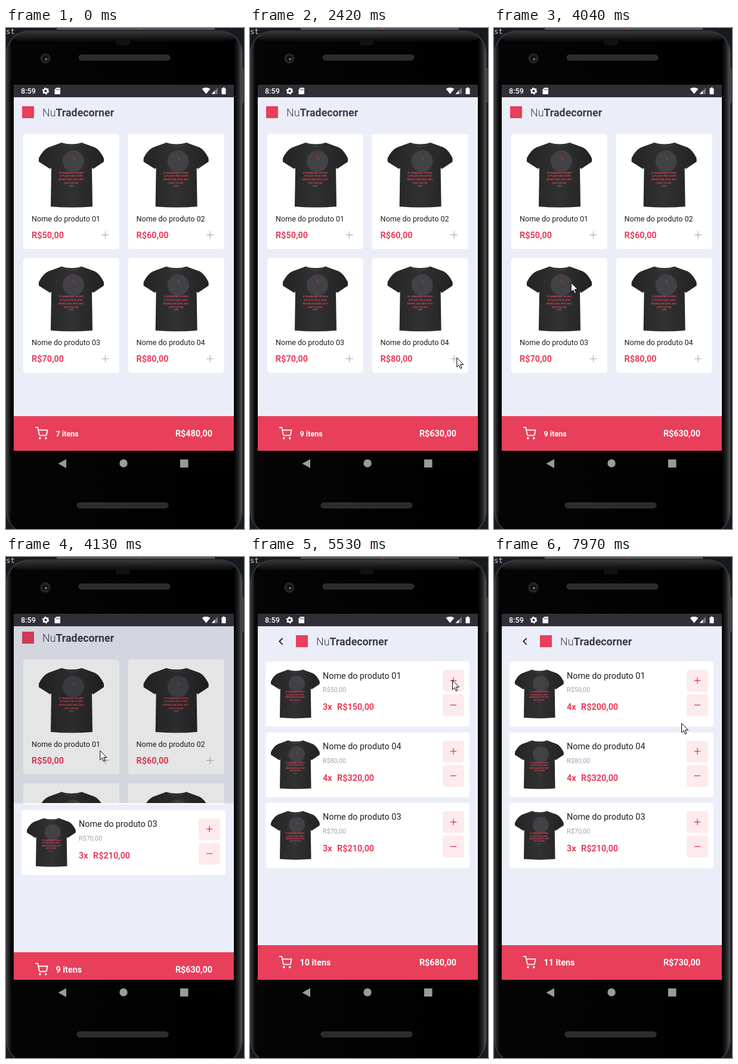
These frames come from a looping animation (399 px wide and 839 px high, 8000 ms). An HTML page:

```html
<!DOCTYPE html>
<html lang="pt-BR">
<head>
<meta charset="utf-8">
<title>Loja</title>
<style>
  html, body { margin: 0; width: 100%; height: 100%; overflow: hidden; background: #161b22; }
  svg { display: block; font-family: Roboto, sans-serif; }
  .b { font-weight: 700; }
</style>
</head>
<body>
<svg id="stage" width="399" height="839" viewBox="0 0 399 839"></svg>
<script>
const RED = '#e83f5b', PAPER = '#ebeef8', INK = '#1f1f23';
const TOP = 116, HEIGHT = 592, LOOP = 8000;
const DP = 0.898;
const SMALL = 14 * DP, MEDIUM = 16 * DP;
const stage = document.getElementById('stage');

const money = n => `R$${n},00`;
const rect = (x, y, w, h, fill, r = 0, more = '') =>
  `<rect x="${x}" y="${y}" width="${w}" height="${h}" rx="${r}" fill="${fill}" ${more}/>`;
const text = (x, y, size, fill, content, more = '') =>
  `<text x="${x}" y="${y}" font-size="${size}" fill="${fill}" ${more}>${content}</text>`;
const line = (d, color, width) =>
  `<path d="${d}" fill="none" stroke="${color}" stroke-width="${width}"/>`;
const sign = (x, y, r, color, plus = true) =>
  line(`M${x - r} ${y}h${2 * r}` + (plus ? `M${x} ${y - r}v${2 * r}` : ''), color, 1.4);

const products = [1, 2, 3, 4].map(n => ({ name: `Nome do produto 0${n}`, price: 40 + 10 * n }));
const cartOrder = [0, 3, 2];

const header = x => rect(x, 131, 20, 20, RED) +
  text(x + 34, 147.5, 17.8, '#3d3d4d',
    '<tspan font-weight="300">Nu</tspan><tspan class="b">Tradecorner</tspan>');

const footer = (id, size) => rect(13, 650, 369, 58, RED) +
  `<g transform="translate(48.8 668) scale(.9)" fill="none" stroke="#fff" stroke-width="2" stroke-linecap="round" stroke-linejoin="round">
    <circle cx="9" cy="21" r="1"/><circle cx="20" cy="21" r="1"/>
    <path d="M1 1h4l2.7 13.4a2 2 0 0 0 2 1.6h9.7a2 2 0 0 0 2-1.6L23 6H6"/></g>` +
  text(83.5, 684, size, '#fff', '', `id="${id}Count" class="b"`) +
  text(346, 684.3, MEDIUM, '#fff', '', `id="${id}Total" class="b" text-anchor="end"`);

function shopCard({ name, price }, i) {
  const x = 29 + 175.6 * (i % 2), y = 177.5 + 207.4 * (i >> 1);
  return rect(x, y, 161, 192.5, '#fff', 4.5) +
    `<use href="#tee" x="${x + 26}" y="${y + 13.5}"/>` +
    text(x + 14, y + 146.5, SMALL, INK, name) +
    text(x + 14, y + 174.5, MEDIUM, RED, money(price), 'class="b"') +
    sign(x + 137.5, y + 169, 6, '#b7b7cc');
}

function cartCard(p, row) {
  const { name, price } = products[p], y = 175 + 118.4 * row;
  return rect(26, y, 342, 109, '#fff', 4.5) +
    `<use href="#tee" transform="translate(35 ${y + 13}) scale(.75)"/>` +
    text(122, y + 28.5, MEDIUM, INK, name) +
    text(122, y + 51.3, 12 * DP, '#a0a0b2', money(price)) +
    text(122, y + 81.3, MEDIUM, RED, '', `id="qty${p}" class="b"`) +
    text(146, y + 81.3, MEDIUM, RED, '', `id="sum${p}" class="b"`) +
    rect(323, y + 14, 36, 36.5, RED, 4.5, 'opacity=".11"') + sign(341, y + 32, 5.2, RED) +
    rect(323, y + 55, 36, 36.5, RED, 4.5, 'opacity=".11"') + sign(341, y + 73, 5.2, RED, false);
}

const shirtLines = ['IF SOMEONE OFFERS', 'A PLACE ON A SHIP,', 'NEVER ASK WHY, BUT', 'JUST GO ON.'];
const defs = `<defs>
  <linearGradient id="edge"><stop offset="0" stop-color="#3a3b3d"/><stop offset=".02" stop-color="#050505"/>
    <stop offset=".965" stop-color="#000"/><stop offset=".985" stop-color="#242527"/><stop offset="1" stop-color="#555759"/></linearGradient>
  <linearGradient id="rim" x2="0" y2="1"><stop stop-color="#353638"/><stop offset="1" stop-color="#353638" stop-opacity="0"/></linearGradient>
  <pattern id="mesh" width="3" height="3" patternUnits="userSpaceOnUse"><path d="M0 3L3 0" stroke="#4a4a4a" stroke-width=".8"/></pattern>
  <linearGradient id="cloth"><stop offset="0" stop-color="#242424"/><stop offset=".5" stop-color="#313131"/><stop offset="1" stop-color="#222"/></linearGradient>
  <clipPath id="screen"><rect x="13" y="${TOP}" width="369" height="${HEIGHT}"/></clipPath>
  <clipPath id="reveal"><rect id="window" x="13" y="${TOP}" width="369" height="${HEIGHT}"/></clipPath>
  <g id="tee">
    <path d="M38 1Q55 6 72 1L94 9Q102 13 109 27V33L91 45 89 43 90 108Q55 111 20 108L21 43 19 45 0 33V27Q7 13 16 9Z" fill="url(#cloth)"/>
    <path d="M38 1Q55 14 72 1" fill="none" stroke="#454545"/>
    <circle cx="58" cy="32" r="18" fill="#414146"/>
    ${line('M56 23l5 7', '#a83a48', 1.2)}
    ${shirtLines.map((s, i) => text(54.5, 52.5 + 5.9 * i, 4.3, '#d34358', s, 'class="b" text-anchor="middle"')).join('')}
    ${text(54.5, 75, 3, '#888', 'SHIRT', 'text-anchor="middle"')}
  </g>
</defs>`;

const speaker = (x, y) => rect(x, y, 153, 9, '#202020', 4.5, 'stroke="#343434"') + rect(x, y, 153, 9, 'url(#mesh)', 4.5);

const phone = rect(85, 0, 265, 3, '#55585e') + rect(221, 0, 4, 3, '#b0404c') +
  text(-7, 10, 12, '#e7c9cd', 'ost', 'font-family="DejaVu Sans Mono, monospace"') +
  rect(393, 66, 5, 60, '#55575a', 2) +
  rect(1, 5, 395, 842, 'url(#edge)', 38, 'stroke="#3c3e40" stroke-width="1.5"') +
  rect(12, 6, 372, 18, 'url(#rim)', 28) +
  rect(184, 19, 24, 10, '#121212', 5) + speaker(122, 45) + speaker(119, 795) +
  '<circle cx="66" cy="51" r="8" fill="#202123" stroke="#303134"/><circle cx="66" cy="51" r="4" fill="#0a0c10"/><circle cx="67" cy="52" r="1.8" fill="#8a8d92"/>' +
  rect(13, 95, 369, 613, '#312e38') +
  text(25, 110.3, 12.6, '#fff', '8:59', 'font-weight="500"') +
  '<circle cx="66.5" cy="105.5" r="3.4" fill="none" stroke="#fff" stroke-width="2.6"/>' +
  '<circle cx="66.5" cy="105.5" r="5" fill="none" stroke="#fff" stroke-width="1.6" stroke-dasharray="2.6 2.63"/>' +
  '<path d="M84.5 100H91V111H81.500V103Z" fill="#fff"/>' +
  line('M84.800 102v2.500M87 102v2.500M89.200 102v2.500', '#312e38', 0.9) +
  '<path d="M328.500 102Q335.500 97.500 342.500 102L335.500 110.500Z" fill="#fff"/>' +
  '<path d="M355 100V110.500H344.500Z" fill="#77757c"/><path d="M350 105V110.500H344.500Z" fill="#fff"/>' +
  '<path d="M361.500 101H363.500V99.500H366.500V101H368.500V111H361.500Z" fill="#fff"/>' +
  '<path d="M101 722V737L87.500 729.500Z" fill="#9b9b9b"/><circle cx="197" cy="729" r="6.700" fill="#9b9b9b"/>' +
  rect(292, 722.5, 13.5, 13.5, '#9b9b9b');

stage.innerHTML = defs + phone +
  `<g clip-path="url(#screen)">
    ${rect(13, TOP, 369, HEIGHT, PAPER)}
    <g id="shop">${rect(13, TOP, 369, HEIGHT, PAPER)}${header(27)}${products.map(shopCard).join('')}${footer('shop', SMALL)}</g>
    ${rect(13, TOP, 369, HEIGHT, '#000', 0, 'id="dim"')}
    <g id="cartView" clip-path="url(#reveal)"><g id="cart">
      ${rect(13, TOP, 369, HEIGHT, PAPER)}${line('M54.700 136L49.300 141.300 54.700 146.700', INK, 1.8)}
      ${header(77)}${cartOrder.map(cartCard).join('')}${footer('cart', MEDIUM)}
    </g></g>
  </g>
  <path id="pointer" d="M.5 .5V16L4 12.700 6.500 18.500 8.900 17.400 6.400 11.800H11.500Z" fill="#fff" stroke="#000"/>`;

const el = {};
stage.querySelectorAll('[id]').forEach(node => el[node.id] = node);

// [time, product, change in quantity]
const taps = [[1640, 2, 1], [2340, 3, 1], [5290, 0, 1], [6220, 0, 1], [7070, 3, 1], [7710, 3, -1]];

// [time, x, y]
const route = [
  [70, 198, 828], [230, 280, 740], [350, 301, 660], [540, 234, 564], [630, 234, 564],
  [940, 179, 556], [1090, 174, 555], [1240, 170, 554], [1640, 168, 552], [1960, 348, 550],
  [2500, 346, 552], [3050, 182, 677], [3130, 160, 676], [3360, 80, 673], [3600, 62, 668],
  [3830, 62, 668], [4130, 157, 324], [4360, 213, 269], [4670, 328, 226], [4750, 332, 222],
  [5050, 339, 206], [6300, 339, 206], [6750, 342, 323], [7100, 342, 323], [7400, 344, 364],
  [7660, 344, 364], [7970, 314, 278], [LOOP, 314, 278]
];

function pointerAt(t) {
  const i = Math.max(1, route.findIndex(k => k[0] > t));
  const [t0, x0, y0] = route[i - 1], [t1, x1, y1] = route[i];
  const k = (t - t0) / (t1 - t0);
  return [x0 + (x1 - x0) * k, y0 + (y1 - y0) * k];
}

// cubic-bezier(.35, .45, 0, 1), solved by bisection
function ease(x) {
  if (x <= 0 || x >= 1) return x <= 0 ? 0 : 1;
  const curve = (s, a, b) => 3 * (1 - s) ** 2 * s * a + 3 * (1 - s) * s * s * b + s ** 3;
  let lo = 0, hi = 1;
  for (let i = 0; i < 24; i++) {
    const mid = (lo + hi) / 2;
    if (curve(mid, 0.35, 0) < x) lo = mid; else hi = mid;
  }
  return curve(lo, 0.45, 1);
}

function draw(t) {
  const quantity = [2, 0, 2, 3];
  for (const [time, p, change] of taps) if (t >= time) quantity[p] += change;
  const count = quantity.reduce((a, b) => a + b);
  const total = quantity.reduce((sum, q, p) => sum + q * products[p].price, 0);
  for (const view of ['shop', 'cart']) {
    el[view + 'Count'].textContent = `${count} itens`;
    el[view + 'Total'].textContent = money(total);
  }
  for (const p of cartOrder) {
    el['qty' + p].textContent = quantity[p] + 'x';
    el['sum' + p].textContent = money(quantity[p] * products[p].price);
  }

  const p = ease((t - 4059) / 355), hidden = HEIGHT * (1 - p);
  el.shop.setAttribute('transform', `translate(0 ${-0.02 * HEIGHT * p})`);
  el.dim.setAttribute('opacity', 0.1 * Math.min(1, p / 0.36));
  el.window.setAttribute('y', TOP + hidden);
  el.cart.setAttribute('transform', `translate(0 ${0.04 * hidden})`);
  el.cartView.setAttribute('visibility', p > 0 ? 'visible' : 'hidden');

  const [x, y] = pointerAt(t);
  el.pointer.setAttribute('transform', `translate(${x} ${y})`);
  el.pointer.setAttribute('visibility', t < 70 ? 'hidden' : 'visible');
}

const start = performance.now();
function tick() {
  draw((performance.now() - start) % LOOP);
  requestAnimationFrame(tick);
}
tick();
</script>
</body>
</html>
```
